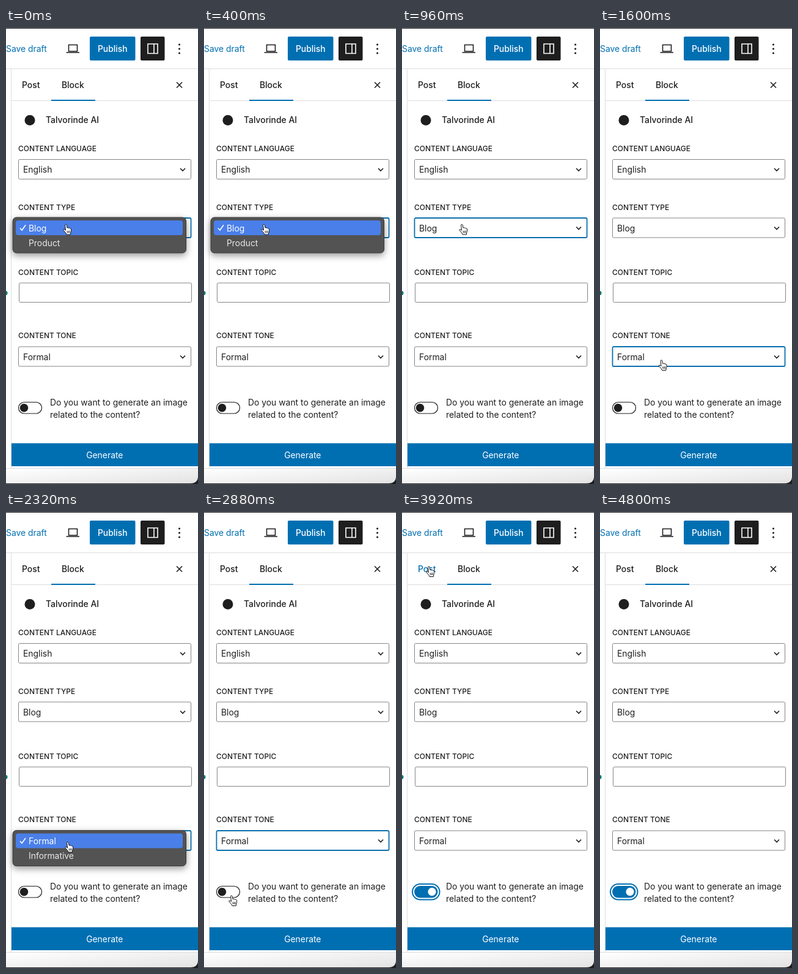
Animation of 314x744 px, one loop 4.88 s. Source, as an HTML page:

```html
<!DOCTYPE html>
<html lang="en">
<head>
<meta charset="utf-8">
<style>
  html, body { margin: 0; width: 100%; height: 100%; overflow: hidden; background: #fff; }
  svg { display: block; width: 314px; height: 744px; font: 13.9px Inter, sans-serif; fill: #1e1e1e; }
  .medium { font-weight: 500; }
  .label { font-size: 11.95px; font-weight: 500; }
  .line { fill: none; stroke: #1e1e1e; stroke-width: 1.6; }
  .box { fill: none; stroke: #858585; }
  .focus .box { stroke: #0a70ad; stroke-width: 1.8; }
  .blue { fill: #006fb2; }
  .white { fill: #fff; }
  .rule { stroke: #dedede; }
  .menu { filter: drop-shadow(0 4px 6px #0006); }
</style>
</head>
<body>
<svg viewBox="0 0 314 744">
  <defs>
    <linearGradient id="footer" x2="1" y2="1">
      <stop stop-color="#fff"/><stop offset="1" stop-color="#e2e2e2"/>
    </linearGradient>
  </defs>

  <!-- window frame -->
  <rect y="719" width="314" height="25" fill="url(#footer)"/>
  <path d="M0 0H314V1H0ZM314 731V744H0V743H302Q314 743 314 731Z"/>
  <path class="rule" d="M0 66.5H314M8.5 67V718M9 118.5H314M0 718.5H314"/>
  <circle cx="-1" cy="432.5" r="3.5" fill="#007a75"/>

  <!-- toolbar -->
  <text x="0" y="39" fill="#006fb2">Save draft</text>
  <path class="line" d="M102.5 27.5H116.5V38H102.5ZM98.5 40H120"/>
  <rect class="blue" x="137" y="14" width="74.5" height="39" rx="2"/>
  <text class="white medium" x="174.3" y="39" text-anchor="middle">Publish</text>
  <rect x="220" y="14" width="39.5" height="39" rx="2"/>
  <path class="line" style="stroke:#fff" d="M232 26H248V41.5H232ZM242 26V41.5"/>
  <g><circle cx="283.5" cy="27" r="1.6"/><circle cx="283.5" cy="34" r="1.6"/><circle cx="283.5" cy="41" r="1.6"/></g>

  <!-- tabs and heading -->
  <text id="post" class="medium" x="26" y="98">Post</text>
  <text class="medium" x="91" y="98">Block</text>
  <path class="line" d="M279 88.5L288 97.5M288 88.5L279 97.5"/>
  <rect class="blue" x="74" y="117" width="72" height="2"/>
  <circle cx="39" cy="150.5" r="8.5"/>
  <text class="medium" x="65" y="155">Talvorinde AI</text>

  <g id="fields"></g>

  <text x="72" y="615.5">Do you want to generate an image</text>
  <text x="72" y="635.5">related to the content?</text>
  <g id="off">
    <rect class="line" style="stroke-width:1.2" x="20.5" y="610.5" width="38" height="18.5" rx="9.25"/>
    <circle cx="29.5" cy="619.7" r="6.8"/>
  </g>
  <g id="on">
    <rect class="line" style="stroke:#006fb2;stroke-width:2" x="17" y="607" width="44.5" height="25.5" rx="12.75"/>
    <rect class="blue" x="20" y="610" width="38.5" height="19.5" rx="9.75"/>
    <circle class="white" cx="49" cy="619.7" r="6.6"/>
  </g>

  <rect class="blue" x="9" y="677.5" width="305" height="37.5"/>
  <text class="white" x="161.3" y="702" text-anchor="middle">Generate</text>

  <g id="menus"></g>

  <g id="cursor">
    <path fill="#fff" stroke="#111" stroke-linejoin="round" d="M4.2 2.4Q4 .9 5.2 .8T6.8 2.2L7.6 6.6Q8.6 5.6 9.8 6.9Q11 6 12 7.4Q13.6 6.9 14 8.6Q14.6 11.5 13.4 14L12.8 17.5H6.6Q5.8 14.8 2.2 11.4Q.6 9.8 1.8 9Q3 8.6 5 10.6Z"/>
    <path class="line" style="stroke-width:.9" d="M7.5 11.5L7.9 15M9.5 11.3L9.8 15M11.5 11L11.6 15"/>
  </g>
</svg>

<script>
const LOOP = 4880, STEP = 80;
const el = id => document.getElementById(id);

const label = (y, text) => `<text class="label" x="20" y="${y}">${text}</text>`;

const select = (id, y, text) => `<g id="${id}" transform="translate(0 ${y})">
  <rect class="box" x="20.5" y=".5" width="282" height="32" rx="2"/>
  <text x="28" y="22">${text}</text>
  <path class="line" d="M285 15L289 19L293 15"/></g>`;

// The field is repeated above its menu while the menu fades.
const menu = (id, y, chosen, other) => `<g id="${id}Menu" class="menu" transform="translate(0 ${y})">
  <rect x="11" y=".5" width="283.5" height="58" rx="6" fill="#535354" stroke="#3c3c3d"/>
  <rect x="16" y="5.5" width="273" height="24" rx="4" fill="#4a7fe9"/>
  <path class="line" style="stroke:#fff" d="M23 18L26 21.5L32 13"/>
  <text class="white" x="37" y="23">${chosen}</text>
  <text x="37" y="47" fill="#e8e8e8">${other}</text></g>
  <use id="${id}Top" href="#${id}"/>`;

el("fields").innerHTML =
  label(201.3, "CONTENT LANGUAGE") + select("language", 214, "English") +
  label(296.8, "CONTENT TYPE") + select("type", 309.5, "Blog") +
  label(402.8, "CONTENT TOPIC") +
  `<rect class="box" x="21.5" y="416" width="282" height="31.5" rx="2"/>` +
  label(506.3, "CONTENT TONE") + select("tone", 519.5, "Formal");

el("menus").innerHTML =
  menu("type", 308.5, "Blog", "Product") + menu("tone", 519, "Formal", "Informative");

// time, x, y
const path = [
  [0, 92.5, 319.5], [960, 92.5, 319.5], [1440, 95, 541], [1760, 95, 541],
  [2240, 95.5, 537.5], [2560, 95.5, 537.5], [2880, 39.5, 625],
  [3440, 39.5, 625], [3840, 38.5, 88], [LOOP, 38.5, 88]
];

function cursorAt(t) {
  const i = path.findIndex(p => p[0] > t);
  const [t0, x0, y0] = path[i - 1], [t1, x1, y1] = path[i];
  const u = (t - t0) / (t1 - t0), e = u * u * (3 - 2 * u);
  return [x0 + (x1 - x0) * e, y0 + (y1 - y0) * e];
}

const show = (id, on) => el(id).style.display = on ? "" : "none";

function drawMenu(id, t, open, close) {
  const opacity = t < open ? 0 : Math.max(0, Math.min(1, 1 - (t - close) / 220));
  el(id + "Menu").style.opacity = opacity;
  show(id + "Top", opacity > 0 && opacity < 1);
}

function draw(now) {
  const t = Math.floor(now % LOOP / STEP) * STEP;
  const toggled = t >= 3120, hovering = t >= 3840 && t < 4160;

  el("cursor").setAttribute("transform", `translate(${cursorAt(t)})`);
  show("cursor", t < 4160);
  el("post").style.fill = hovering ? "#006fb2" : "";

  el("type").classList.toggle("focus", t < 1520);
  el("tone").classList.toggle("focus", t >= 1520 && !toggled);
  drawMenu("type", t, 0, 405);
  drawMenu("tone", t, 1680, 2485);

  show("off", !toggled);
  show("on", toggled);
  requestAnimationFrame(draw);
}
requestAnimationFrame(draw);
</script>
</body>
</html>
```
